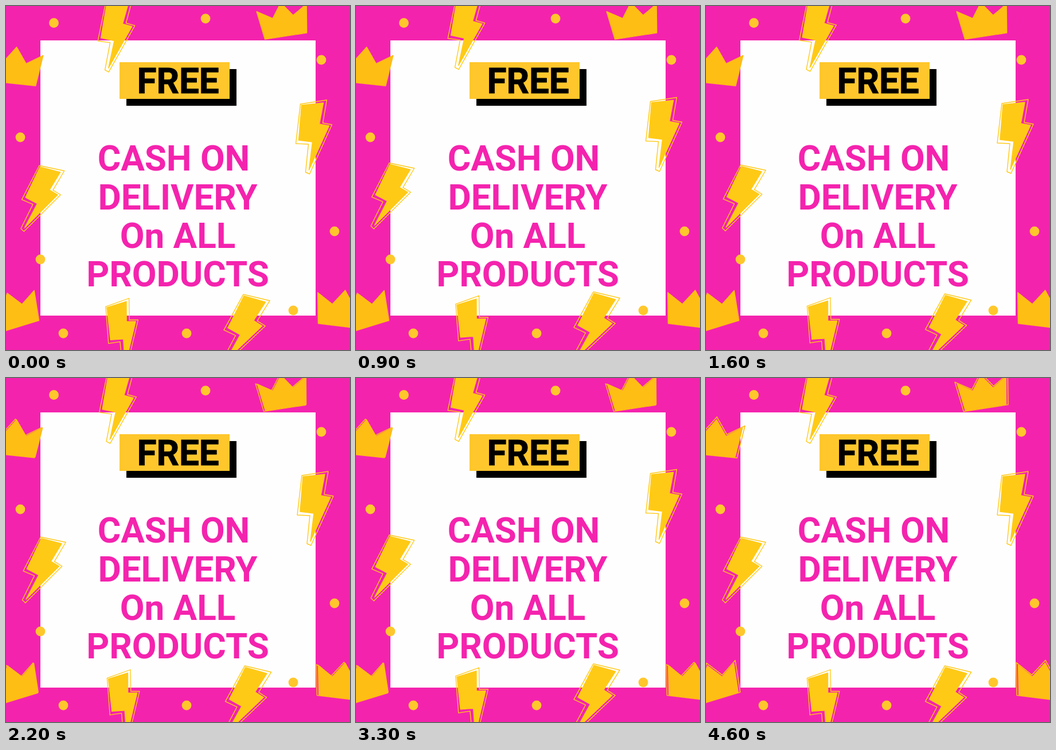
Write an HTML page that moves like this. It is 600 by 600 pixels and loops after 4.7 s.

```html
<!DOCTYPE html>
<html lang="en">
<head>
<meta charset="utf-8">
<title>Free cash on delivery</title>
<style>
  html, body { margin: 0; width: 100%; height: 100%; overflow: hidden; background: #f423ae; }
  svg { display: block; width: 100%; height: 100%; }
  text { font: 700 62px Roboto, Arial, sans-serif; letter-spacing: -.1px; text-anchor: middle; }
  .fill, .line { stroke-linejoin: round; stroke-width: 1.4; }
  .line { fill: none; }
  .bolt { fill: #ffca16; stroke: #ffca16; }
  .crown { fill: #ffbe14; stroke: #ffbe14; }
</style>
</head>
<body>
<svg viewBox="0 0 600 600">
  <defs>
    <path id="bolt" class="fill" d="M-22-56L16-60 9-23 26-20-9 57-3 8-27 5Z"/>
    <path id="boltLine" class="line" d="M-24-58L22-65 15-25 31-22-8 64-15 61-10 12-32 11Z"/>
    <path id="crown" class="fill" d="M-36 0L-43-48-18-32 0-57 18-32 43-48 36 0Z"/>
    <path id="crownLine" class="line" d="M-37 1L-44-49-18-33 0-58 18-33 44-49 37 1Z"/>
  </defs>
  <rect width="600" height="600" fill="#f423ae"/>
  <rect x="60" y="60" width="480" height="480" fill="#fffeff"/>
  <g id="dots" fill="#ffc72c"></g>
  <g id="crowns" class="crown"></g>
  <g id="bolts" class="bolt"></g>
  <rect x="210" y="110" width="192" height="64"/>
  <rect x="198" y="98" width="192" height="64" fill="#ffc72c"/>
  <text x="300" y="152" stroke="#000" stroke-width=".8">FREE</text>
  <g fill="#f423ae">
    <text x="292.5" y="287">CASH ON</text>
    <text x="299.5" y="354.5">DELIVERY</text>
    <text x="299.5" y="421.5">On ALL</text>
    <text x="299.5" y="489">PRODUCTS</text>
  </g>
</svg>
<script>
const LOOP = 4700, STEP = 100;
const byId = id => document.getElementById(id);

function add(parent, tag, attrs) {
  const el = document.createElementNS('http://www.w3.org/2000/svg', tag);
  for (const key in attrs) el.setAttribute(key, attrs[key]);
  return parent.appendChild(el);
}

// Puts a shape and its loose line in place; returns the line.
function place(kind, x, y, turn, scale) {
  const group = add(byId(kind + 's'), 'g',
    { transform: `translate(${x} ${y}) rotate(${turn}) scale(${scale})` });
  add(group, 'use', { href: '#' + kind });
  return add(group, 'use', { href: `#${kind}Line` });
}

for (const [cx, cy] of [[83.5, 29.5], [348, 22], [550, 94], [25, 229], [573, 393],
  [60, 442], [100, 571], [315, 571], [501, 531]])
  add(byId('dots'), 'circle', { cx, cy, r: 8.4 });

place('bolt', 540, 228, 0, 1);
place('bolt', 195, 52, 5, .985);
place('bolt', 62.5, 337.5, 20.6, .96);
place('bolt', 208.5, 572, -11, .93);
place('bolt', 417, 566, 22, 1.02);

const rims = [
  place('crown', 12, 134, 6, 1.08),
  place('crown', 488, 51.5, -8.7, 1),
  place('crown', 20, 559, -17, 1.05),
  place('crown', 584, 557.5, 7, 1.07)
];

// Hand-drawn wobble: each pose holds for a few steps.
const boltPoses = ['translate(-2.5 1)', 'translate(-2.5 -3.5)', ''];
const rimPoses = ['scale(1.06)', 'translate(-2 0)', ''];
const poseAt = (poses, step, hold) => poses[Math.floor(step / hold) % poses.length];

function draw(now) {
  const step = Math.floor(now % LOOP / STEP);
  byId('bolts').setAttribute('transform', poseAt(boltPoses, step, 2));
  for (const rim of rims) rim.setAttribute('transform', poseAt(rimPoses, step + 8, 3));
}

const start = performance.now();
function tick() {
  draw(performance.now() - start);
  requestAnimationFrame(tick);
}
draw(0);
requestAnimationFrame(tick);
</script>
</body>
</html>
```
